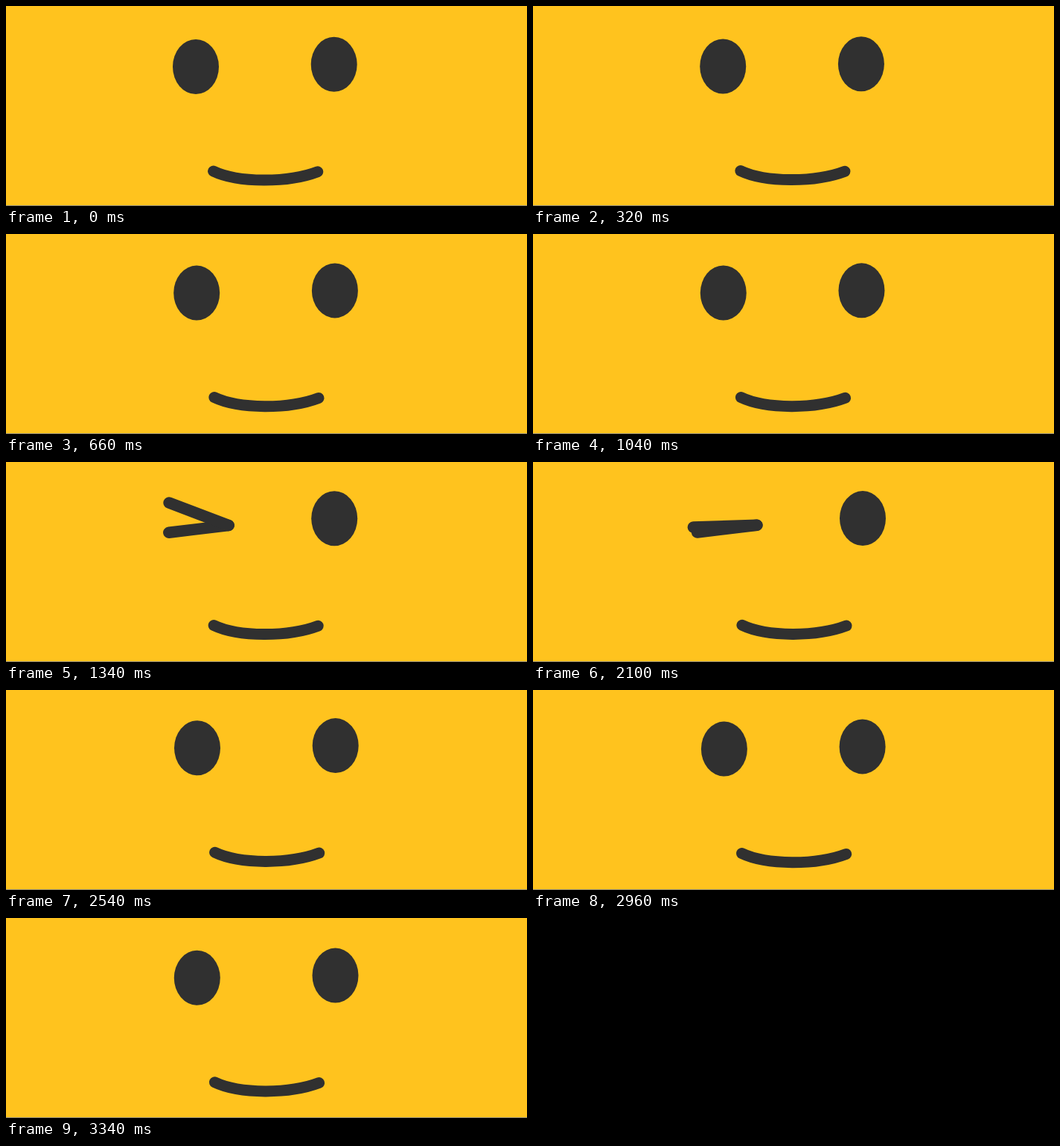
These frames come from a looping animation (700 px wide and 270 px high, 3360 ms). An HTML page:

```html
<!DOCTYPE html>
<html lang="en">
<head>
<meta charset="utf-8">
<title>Winking face</title>
<style>
html, body { margin: 0; width: 100%; height: 100%; overflow: hidden; background: #ffc31e; }
svg { display: block; }
.line { fill: none; stroke: #303030; stroke-width: 15; stroke-linecap: round; }
#wink { stroke-width: 15.5; }
</style>
</head>
<body>
<svg width="700" height="270" viewBox="0 0 700 270">
  <rect width="700" height="270" fill="#ffc31e"/>
  <rect y="269" width="700" height="1" fill="#8a8678"/>
  <g id="face" fill="#303030">
    <ellipse id="eye" cx="255" cy="82" rx="31" ry="37"/>
    <ellipse cx="440.7" cy="78.8" rx="31" ry="37"/>
    <g id="wink" class="line">
      <path d="M218.3 97.7L298.6 88"/>
      <path id="lid" d="M213 88H298.6"/>
    </g>
    <path class="line" d="M278.6 223C312 239 379 239 418.8 223.8"/>
  </g>
</svg>
<script>
const LOOP = 3360, WINK_START = 1120, WINK_END = 2120;
const [face, eye, wink, lid] = ['face', 'eye', 'wink', 'lid'].map(id => document.getElementById(id));

// Key points of the slow drift of the whole face
const drift = [
  { at: 0, x: 0, y: 0 },
  { at: 100, x: -0.4, y: 0.7 },
  { at: 620, x: 1.2, y: -2.4 },
  { at: 1340, x: 0.5, y: -2.5 },
  { at: 1820, x: 1, y: -2.5 },
  { at: 2100, x: 2.3, y: -2.7 },
  { at: 2540, x: 2, y: -3.7 },
  { at: LOOP, x: 1.8, y: -1.2 }
];

// Smooth progress from 0 to 1 between two times
function ease(t, from, to) {
  const p = Math.min(1, Math.max(0, (t - from) / (to - from)));
  return p * p * (3 - 2 * p);
}

function driftAt(t) {
  const i = drift.findIndex(key => key.at > t);
  const a = drift[i - 1], b = drift[i], p = ease(t, a.at, b.at);
  return `translate(${a.x + (b.x - a.x) * p} ${a.y + (b.y - a.y) * p})`;
}

function draw() {
  const t = performance.now() % LOOP;
  const winking = t >= WINK_START && t < WINK_END;
  const opening = ease(t, WINK_START, WINK_START + 100);
  const closing = ease(t, 1900, WINK_END - 20);
  face.setAttribute('transform', driftAt(t));
  lid.setAttribute('transform', `rotate(${14 + 6.8 * opening - 22.6 * closing} 298.6 88)`);
  eye.style.display = winking ? 'none' : '';
  wink.style.display = winking ? '' : 'none';
  requestAnimationFrame(draw);
}
draw();
</script>
</body>
</html>
```
